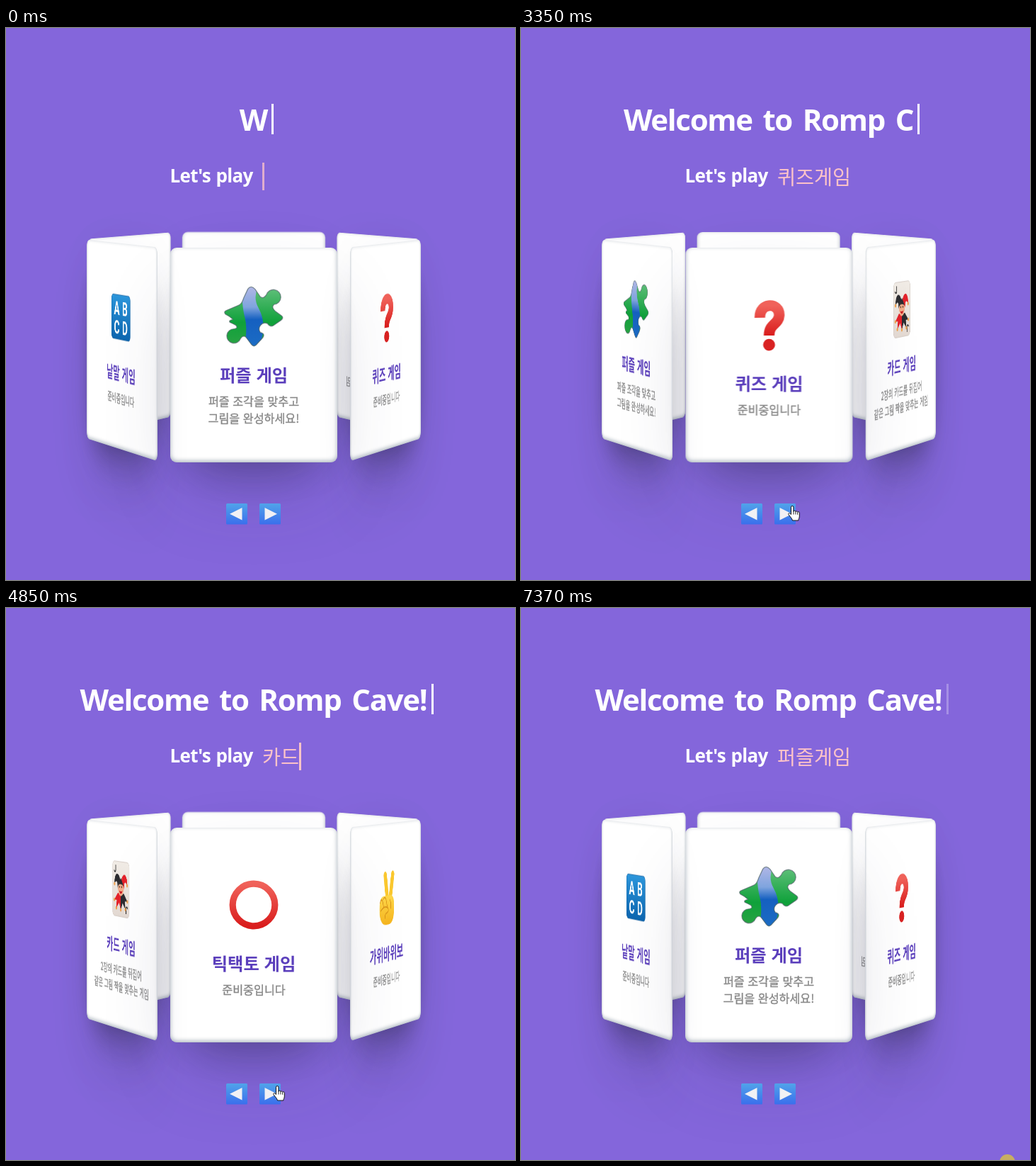
An HTML page for the animation above (7450 ms loop, 719 by 779 pixels).

```html
<!DOCTYPE html>
<html lang="ko">
<head>
<meta charset="utf-8">
<title>Game carousel</title>
<style>
  html, body { margin: 0; width: 100%; height: 100%; overflow: hidden; background: #8466db; }
  .stage { position: relative; width: 719px; height: 779px; overflow: hidden; background: #8466db; color: #fff; }
  .stage > * { position: absolute; }

  h1, h2 { margin: 0; white-space: pre; font-family: "Open Sans", "Noto Sans", sans-serif; font-weight: 700; }
  h1 { left: 0; top: 99px; width: 708px; text-align: center; font-size: 42px; line-height: 60px; letter-spacing: -1.3px; word-spacing: 5px; }
  h2 { left: 231.5px; top: 188px; font-size: 26px; line-height: 40px; letter-spacing: -.7px; word-spacing: 1.5px; }
  .caret { display: inline-block; background: currentColor; }
  h1 .caret { width: 3px; height: 43px; margin-left: 6px; vertical-align: -5px; }
  .word { left: 362px; top: 189px; height: 40px; display: flex; align-items: center; color: #ffc4c8;
    font: 400 28.3px/40px "Noto Sans CJK KR", "Noto Sans CJK", sans-serif; white-space: pre; }
  .word .caret { width: 2.5px; height: 39px; }

  .scene { inset: 0; perspective: 2687px; perspective-origin: 350px 157px; }
  .ring { position: absolute; left: 232px; top: 310px; width: 236px; height: 303px;
    transform-style: preserve-3d; animation: spin 7450ms infinite ease; }
  .card { position: absolute; inset: 0; box-sizing: border-box; padding-top: 4px; border-radius: 9px; background: #fff;
    display: flex; flex-direction: column; align-items: center; justify-content: center;
    transform: rotateY(calc(var(--i) * 60deg)) translateZ(226px);
    font-family: "Noto Sans CJK KR", "Noto Sans CJK", sans-serif; text-align: center; white-space: nowrap;
    box-shadow: 0 54px 107px -21px rgba(50, 50, 93, .25), 0 32px 64px -32px rgba(0, 0, 0, .3),
      inset 0 -2px 6.4px rgba(10, 37, 64, .35); }
  .card svg { width: 84px; height: 84px; flex: none; overflow: visible; }
  .card b { margin-top: 20px; font-size: 24.3px; line-height: 40px; color: #5b3fbc; }
  .card span { margin-top: 5px; font-size: 16.2px; font-weight: 500; line-height: 24px; color: #888; -webkit-text-stroke: .4px #888; }

  @keyframes spin {
    0%, 39.93% { transform: translateZ(-226px) rotateY(0deg); }
    45.3%, 51.66% { transform: translateZ(-226px) rotateY(-60deg); }
    57.03%, 59.6% { transform: translateZ(-226px) rotateY(-120deg); }
    64.97%, 67.65% { transform: translateZ(-226px) rotateY(-180deg); }
    73.02%, 76.15% { transform: translateZ(-226px) rotateY(-240deg); }
    81.52%, 84.43% { transform: translateZ(-226px) rotateY(-300deg); }
    89.8%, 100% { transform: translateZ(-226px) rotateY(-360deg); }
  }

  .buttons { left: 311px; top: 671px; }
  .mouse { left: 0; top: 0; animation: travel 7450ms infinite ease-in-out; }
  .mouse svg { position: absolute; overflow: visible; }
  .arrow { animation: arrow 7450ms infinite step-end; }
  .hand { left: -5px; animation: hand 7450ms infinite step-end; }
  .halo { animation: halo 7450ms infinite step-end; }
  @keyframes travel {
    0%, 29.3% { transform: translate(17px, 682px); }
    38.2%, 90.5% { transform: translate(382px, 674px); }
    95.1% { transform: translate(685px, 781px); }
    97%, 100% { transform: translate(687px, 782px); }
  }
  @keyframes arrow { 0% { opacity: 0; } 29.3% { opacity: 1; } 37.5% { opacity: 0; } 91.2% { opacity: 1; } }
  @keyframes hand { 0% { opacity: 0; } 37.5% { opacity: 1; } 91.2% { opacity: 0; } }
  @keyframes halo { 0% { opacity: 0; } 94.6% { opacity: 1; } }
</style>
</head>
<body>
<div class="stage">
  <svg width="0" height="0">
    <defs>
      <linearGradient id="red" x2="0" y2="1"><stop stop-color="#f0625a"/><stop offset="1" stop-color="#d91c1c"/></linearGradient>
      <linearGradient id="blue" x2="0" y2="1"><stop stop-color="#2d97dc"/><stop offset="1" stop-color="#0d66b0"/></linearGradient>
      <linearGradient id="green" x2="0" y2="1"><stop stop-color="#62c07c"/><stop offset=".6" stop-color="#0fa13a"/><stop offset="1" stop-color="#2aa344"/></linearGradient>
      <linearGradient id="band" x2="0" y2="1"><stop stop-color="#b4b8e6"/><stop offset=".35" stop-color="#7fa4de"/><stop offset=".55" stop-color="#1560c0"/><stop offset="1" stop-color="#1b6cc4"/></linearGradient>
      <linearGradient id="gold" x2="0" y2="1"><stop stop-color="#ffd84a"/><stop offset="1" stop-color="#f6b51e"/></linearGradient>
      <linearGradient id="paper" x2="0" y2="1"><stop stop-color="#f1ece6"/><stop offset="1" stop-color="#e4dad3"/></linearGradient>
      <linearGradient id="key" x2="0" y2="1"><stop stop-color="#51a3ea"/><stop offset="1" stop-color="#3a6fec"/></linearGradient>
    </defs>
  </svg>

  <h1><span id="title"></span><i class="caret" id="titleCaret"></i></h1>
  <h2>Let's play</h2>
  <div class="word"><span id="word"></span><i class="caret" id="wordCaret"></i></div>

  <div class="scene"><div class="ring" id="ring"></div></div>

  <svg class="buttons" width="77" height="30">
    <g fill="url(#key)"><rect width="30" height="29.5" rx="1.5"/><rect x="47" width="30" height="29.5" rx="1.5"/></g>
    <path fill="#f1f1f4" d="M5 14.7 22.5 6v17.5zM72 14.7 54.5 6v17.5z"/>
  </svg>

  <div class="mouse">
    <svg class="halo" width="1" height="1"><circle r="11" fill="#c8ae62"/></svg>
    <svg class="arrow" width="13" height="20"><path d="M0 0V16.5l4-3.6 2.8 6 2.6-1.2-2.8-5.7H12z" fill="#fff" stroke="#000"/></svg>
    <svg class="hand" width="17" height="22"><path d="M4.5 12.5V2.2a1.7 1.7 0 0 1 3.4 0V8.5a1.5 1.5 0 0 1 3 .3 1.5 1.5 0 0 1 2.8.7 1.4 1.4 0 0 1 2.6.8V15c0 3-1.5 4-1.5 6H6.5C6 18 3 16 1 12.6c-.8-1.6 1-2.6 2.2-1.3z" fill="#fff" stroke="#111" stroke-linejoin="round"/><path d="M7.9 8.5v4M10.9 9v3.5M13.7 9.8v3" stroke="#111" stroke-width=".9"/></svg>
  </div>
</div>

<script>
const LOOP = 7450;
const TITLE = 'Welcome to Romp Cave!';
const WORDS = ['퍼즐게임', '퀴즈게임', '카드게임'];
const SOON = '준비중입니다';

const piece = 'M2 46Q-1 42 4 40L25 31Q30 29 33 19L40 4Q45-3 52 4L61 17Q66 21 71 14A12.5 12.5 0 1 1 84 30Q79 35 86 41L97 49Q101 53 95 57L82 66Q77 68 73 62A10 10 0 0 0 61 77Q70 79 65 86L54 98Q50 102 46 97L37 85Q32 81 28 87A12 12 0 1 1 17 71Q24 70 20 65Q15 62 10 60Q7 57 15 55Q10 50 2 46Z';
const jesterLetter = '<text x="22" y="21" font-family="Roboto, sans-serif" font-size="18" font-weight="700" fill="#222">J</text>';

const ICONS = {
  puzzle: `<clipPath id="cut"><path d="${piece}"/></clipPath>
    <path d="${piece}" fill="url(#green)"/>
    <g clip-path="url(#cut)"><path d="M30-2H58Q48 18 58 36T66 76L60 102H34Q40 70 35 52T30-2Z" fill="url(#band)"/></g>
    <path d="${piece}" fill="none" stroke="#52606a" stroke-opacity=".6" stroke-width="1.6"/>`,
  quiz: `<path d="M34.5 38C34 11 68 12 67 34C66 50 50 47 50 68" fill="none" stroke="url(#red)" stroke-width="18"/>
    <circle cx="50" cy="83.5" r="10" fill="#d92222"/>`,
  joker: `<rect x="17" y="2" width="66" height="96" rx="8" fill="url(#paper)" stroke="#cfc4bc"/>
    ${jesterLetter}<g transform="rotate(180 50 50)">${jesterLetter}</g>
    <path d="M50 42Q46 22 33 24 24 28 25 42 31 34 36 39 37 48 40 52Z" fill="#2c2c30"/>
    <path d="M50 42Q54 22 67 24 76 28 75 42 69 34 64 39 63 48 60 52Z" fill="#e3222a"/>
    <path d="M50 58 38 57 24 70 34 70 32 84 43 74 50 86Z" fill="#e3222a"/>
    <path d="M50 58 62 57 76 70 66 70 68 84 57 74 50 86Z" fill="#2c2c30"/>
    <ellipse cx="50" cy="49" rx="11" ry="13" fill="#f3b08c"/>
    <path d="M39 44Q45 36 50 30 55 36 61 44 50 38 39 44Z" fill="#2c2c30"/>
    <path d="M43 52Q50 64 57 52 50 56 43 52Z" fill="#c9141d"/>
    <g fill="#33231f"><circle cx="46" cy="46" r="1.7"/><circle cx="54" cy="46" r="1.7"/></g>
    <g fill="#f0a04b"><circle cx="25" cy="42" r="3"/><circle cx="75" cy="42" r="3"/><circle cx="24" cy="70" r="3"/><circle cx="76" cy="70" r="3"/><circle cx="32" cy="84" r="3"/><circle cx="68" cy="84" r="3"/><circle cx="50" cy="86" r="3"/></g>`,
  ring: '<circle cx="50" cy="50" r="35.5" fill="none" stroke="url(#red)" stroke-width="11"/>',
  hand: `<g fill="none" stroke="#fbc82f" stroke-width="13" stroke-linecap="round"><path d="M53 56 44 11M63 56 74 11"/></g>
    <path d="M24 55Q28 46 42 47H66Q78 49 79 60V75Q78 97 58 98H47Q27 97 22 78Q20 64 24 55Z" fill="url(#gold)"/>
    <path d="M24 58Q28 48 34 56L38 67M36 53Q43 45 48 55L52 66M27 72Q41 62 55 69 60 75 51 77 42 78 43 86M62 55Q68 60 66 70" fill="none" stroke="#d9931a" stroke-width="2" stroke-linecap="round"/>`,
  letters: `<rect x="13" y="11" width="74" height="78" rx="7" fill="url(#blue)" stroke="#0f5d9f"/>
    <g fill="#fff" font-family="Roboto, sans-serif" font-size="34" font-weight="700" text-anchor="middle">
    <text x="34" y="46">A</text><text x="66" y="46">B</text><text x="34" y="80">C</text><text x="66" y="80">D</text></g>`
};

const CARDS = [
  ['puzzle', '퍼즐 게임', '퍼즐 조각을 맞추고<br>그림을 완성하세요!'],
  ['quiz', '퀴즈 게임', SOON],
  ['joker', '카드 게임', '2장의 카드를 뒤집어<br>같은 그림 짝을 맞추는 게임'],
  ['ring', '틱택토 게임', SOON],
  ['hand', '가위바위보', SOON],
  ['letters', '낱말 게임', SOON]
];

const $ = id => document.getElementById(id);

$('ring').innerHTML = CARDS.map(([icon, name, text], i) =>
  `<div class="card" style="--i:${i}"><svg viewBox="0 0 100 100">${ICONS[icon]}</svg><b>${name}</b><span>${text}</span></div>`
).join('');

const blink = ms => .5 + .5 * Math.cos(2 * Math.PI * ms / 758);

// Letters shown at a moment of one word's type, hold and delete cycle.
function letters(ms) {
  const n = ms < 1370 ? Math.floor(ms / 215) : 3 - Math.floor((ms - 1370) / 118);
  return Math.max(0, Math.min(4, n));
}

function draw(t) {
  // A trailing space does not move the caret.
  $('title').textContent = TITLE.slice(0, 1 + Math.floor(t / 200)).trimEnd();
  $('titleCaret').style.opacity = t < 4850 ? 1 : blink(t - 4850);

  const turn = Math.max(0, Math.floor((t - 150) / 2045));
  const ms = t - 150 - turn * 2045;
  const count = letters(ms);
  $('word').textContent = WORDS[turn % WORDS.length].slice(0, count);
  // The caret hides behind a complete word.
  $('wordCaret').style.opacity = count === 4 ? 0 : ms < 0 ? .75 : 1;
}

let start;
function tick(now) {
  start ??= now;
  draw((now - start) % LOOP);
  requestAnimationFrame(tick);
}
draw(0);
requestAnimationFrame(tick);
</script>
</body>
</html>
```
